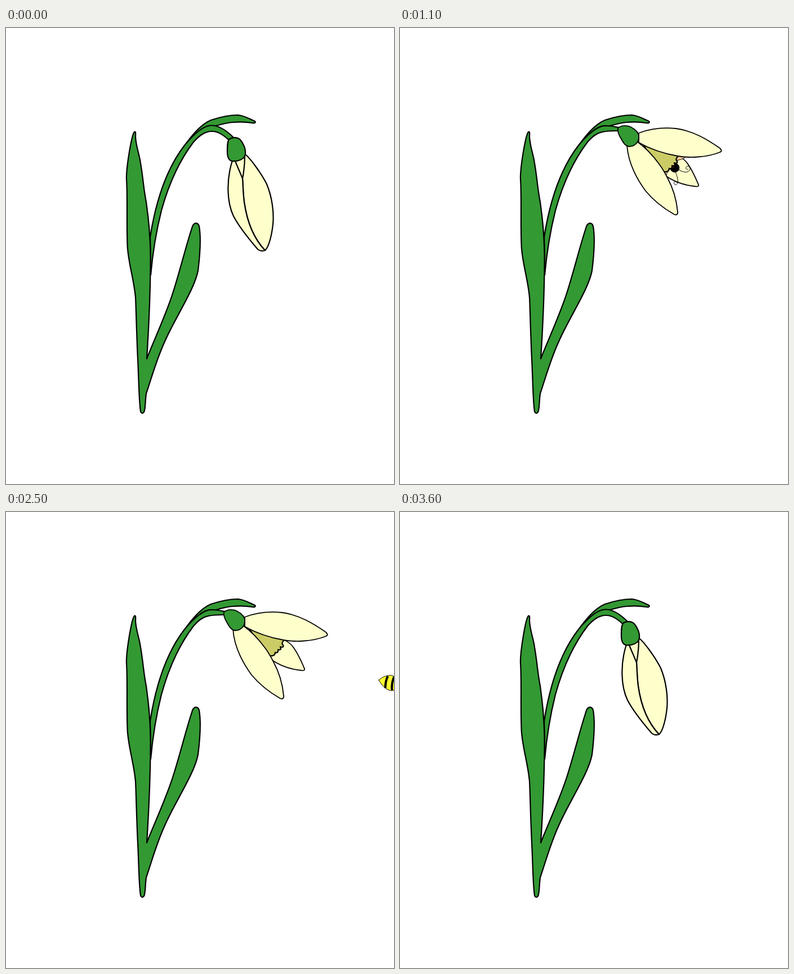
An HTML page for the animation above (3700 ms loop, 689 px wide and 812 px high).

```html
<!DOCTYPE html>
<html lang="en">
<head>
<meta charset="utf-8">
<title>Snowdrop and bee</title>
<style>
  html, body { margin: 0; height: 100%; overflow: hidden; background: #fff; }
  svg { display: block; width: 100%; height: 100%; }
  path, ellipse { stroke: #000; stroke-width: 2.2; stroke-linejoin: round; stroke-linecap: round; }
  .green { fill: #393; }
  .petal { fill: #ffc; }
  #bee path, #bee ellipse { stroke-width: .9; }
  #bee .line { fill: none; }
  #bee .stripe { fill: none; stroke-width: 4; stroke-linecap: butt; }
</style>
</head>
<body>
<svg viewBox="0 0 689 812">
  <path class="green" d="M314 214C328 193 345 172 364 164C385 157 400 155 412 155C424 156 432 162 442 166C444 168 442 170 437 169C425 167 415 167 402 168C390 169 380 172 370 175C360 172 348 178 338 187C330 195 322 203 314 214Z"/>
  <path id="stem" class="green"/>
  <path class="green" d="M228 185C231 183 230 190 230 194C231 212 237 225 239 241C244 270 244 285 249 310C253 338 256 370 256.5 400C257 460 255 510 250 589C261 560 285 508 296.5 471C309 432 320 386 331.5 352C335 346 341 346 343 353C346 370 345 400 341 432C335 465 301 515 283 556C268 588 261 615 249 651C247 664 248 678 245 684C243 687 240 686 239 683C236 665 236 630 234 590C232 550 231 500 230 480C227 445 216 415 215.5 385C214 345 216 300 214 270C213 250 223 190 228 185Z"/>
  <path id="back" class="petal"/>
  <path id="cup" fill="#cc6" d="M433 209C455 216 475 222 494 228Q488 234 492 237Q494 242 487 240Q490 247 483 245Q484 252 478 250Q478 257 469 256C457 244 444 228 433 209Z"/>
  <path id="upper" class="petal"/>
  <path id="front" class="petal"/>
  <path id="ovary" class="green"/>
  <g id="bee">
    <g fill="#fc9">
      <path d="M2 -8C0 -22 6 -32 12 -31C16 -28 12 -15 6 -8Z"/>
      <path d="M5 -7C10 -22 18 -33 27 -33C31 -30 24 -14 5 -7Z"/>
      <path d="M-3 9C-12 12 -19 20 -17 27C-13 31 -4 20 -3 9Z"/>
      <path d="M-2 9C-10 22 -14 36 -8 41C0 42 4 22 2 9Z"/>
    </g>
    <path fill="#ff3" d="M-40 -18C-32 -23 -21 -25 -14 -21C-8 -17 -6 -9 -7 -3C-9 4 -17 6 -23 4C-32 0 -37 -9 -40 -18Z"/>
    <path class="stripe" d="M-23 -22Q-29 -14 -31 -2M-12 -19Q-19 -9 -20 4"/>
    <path class="line" d="M16 4C26 7 36 6 38 0C40 -6 34 -9 31 -5C29 -1 34 1 35 -2M15 10C20 15 25 22 26 27C27 33 20 34 20 29C20 25 25 25 25 28"/>
    <ellipse cx="12" cy="4" rx="8" ry="8"/>
    <ellipse rx="11" ry="10" fill="#630"/>
  </g>
</svg>
<script>
const el = id => document.getElementById(id);

// Each part: closed, half open, and (for petals) wide open.
const parts = {
  stem: [
    'M256 372C265 315 283 253 317 209C332 191 350 174 364 173.5C378 173 393 184 404 195L396 200C388 192 378 184 366 184C352 184 342 193 333 203C305 240 287 285 276 325C266 365 261 395 257 440Z',
    'M256 372C265 315 283 253 317 209C332 191 350 175 364 174C372 174 380 175 388 177L387 183C380 183 370 183 360 185C349 187 342 193 333 203C305 240 287 285 276 325C266 365 261 395 257 440Z'
  ],
  back: [
    'M407 237C413 235 419 232 424 230C428 270 440 330 450 370C451 374 450 374 448 372C440 360 425 320 418 290C412 270 410 250 407 237Z',
    'M437 213C470 215 500 228 508 238C518 250 525 267 530 279C531 282 528 283 524 282C505 280 485 273 470 262C455 250 445 230 437 213Z'
  ],
  upper: [
    'M424 224C436 234 455 262 463 278C473 302 476 330 474 350C472 368 467 390 460 396C440 375 428 345 423 310C421 295 421 280 420 268C422 258 424 240 424 228Z',
    'M424 187C445 185 468 190 485 195C512 204 535 222 555 245C558 250 557 252 552 253C530 255 505 251 482 244C465 228 440 210 424 201C424 198 424 192 424 187Z',
    'M424 187C445 179 470 177 490 179C520 183 545 198 568 214C572 218 572 220 566 222C545 230 515 232 493 228C470 224 445 216 424 204C424 198 424 192 424 187Z'
  ],
  front: [
    'M402 236C391 270 392 310 404 335C416 358 435 380 447 394C452 398 456 397 460 396C440 375 428 345 423 310C421 295 421 282 420 268C416 258 411 247 407 237Z',
    'M407 211C412 243 435 274 456 292C471 304 490 312 512 315.5C517 317 517 314 516 311C511 291 503 273 490 256C484 248 478 241 470 234C455 219 440 208 424 200Z',
    'M403 208C405 240 420 268 436 290C450 307 466 320 487 332C491 334 494 331 493 327C491 306 486 287 475 267C471 259 466 250 460 242C449 227 436 213 422 203Z'
  ],
  ovary: [
    'M396 198C402 194 411 194 416 199C422 206 426 216 425 224C424 234 412 238 402 237C395 236 393 228 393 220C393 210 393 203 396 198Z',
    'M387 178C393 173 405 173 411 177C419 181 425 188 424 195C424 204 416 211 407 211C399 210 396 203 392 196C387 188 386 183 387 178Z'
  ]
};

// Keys are [time, ...values]
const bloom = [[0, 0, 2.2], [600, 1, 1.4], [1100, 2, 1.8], [2500, 2, 1.8], [3000, 1, 1.4], [3600, 0, 2.2], [3700, 0, 2.2]];
const flight = [[1100, 478, 241, 20], [1800, 552.5, 288, 2], [1900, 566, 292, 0], [2500, 704.5, 310, -10]];

// Linear between keys, extended past both ends
function at(keys, t) {
  let i = 1;
  while (i < keys.length - 1 && t > keys[i][0]) i++;
  const [a, b] = [keys[i - 1], keys[i]];
  const k = (t - a[0]) / (b[0] - a[0]);
  return a.slice(1).map((v, j) => v + (b[j + 1] - v) * k);
}

function mix(a, b, k) {
  const to = b.match(/[\d.]+/g);
  let i = 0;
  return a.replace(/[\d.]+/g, n => (+n + (to[i++] - n) * k).toFixed(2));
}

const bee = el('bee'), cup = el('cup'), svg = bee.parentNode;

function draw(now) {
  const t = Math.floor(now % 3700 / 100) * 100;
  const [open, line] = at(bloom, t);
  for (const id in parts) {
    const poses = parts[id];
    const p = Math.min(open, poses.length - 1);
    const i = Math.min(Math.floor(p), poses.length - 2);
    el(id).setAttribute('d', mix(poses[i], poses[i + 1], p - i));
    if (id !== 'stem') el(id).style.strokeWidth = line;
  }
  cup.style.display = open <= 1 ? 'none' : '';

  // The bee starts inside the flower, then flies in front of it.
  const [x, y, turn] = at(flight, t);
  bee.style.display = t < 900 || t > 2600 ? 'none' : '';
  bee.setAttribute('transform', `translate(${x} ${y}) rotate(${turn})`);
  svg.insertBefore(bee, t < 1200 ? cup : null);
  requestAnimationFrame(draw);
}
requestAnimationFrame(draw);
</script>
</body>
</html>
```
